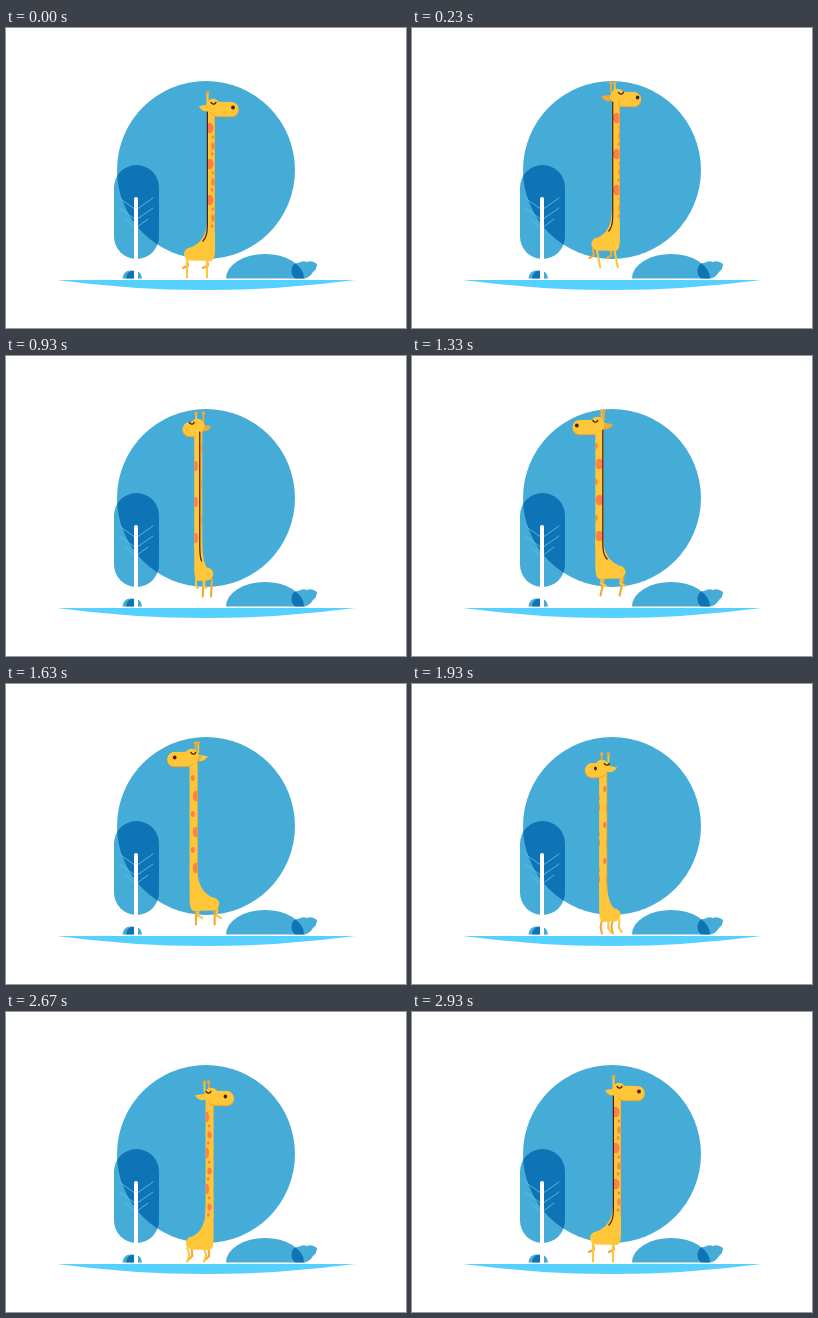
An HTML page with a canvas that plays this animation: 400x300 px, repeating every 2.96 s.

```html
<!DOCTYPE html>
<html lang="en">
<head>
<meta charset="utf-8">
<title>Jumping giraffe</title>
<style>
html, body { margin: 0; width: 100%; height: 100%; overflow: hidden; background: #fff; }
canvas { display: block; width: 400px; height: 300px; }
</style>
</head>
<body>
<canvas id="stage"></canvas>
<script>
const canvas = document.getElementById('stage');
const ctx = canvas.getContext('2d');
const ratio = window.devicePixelRatio || 1;
canvas.width = 400 * ratio;
canvas.height = 300 * ratio;

const LOOP = 2960, STEPS = 88, HOP = 11, AXIS = 196;
const BLUE = '#45abd7', DEEP = '#0f74b5', ICE = '#55d0ff';
const SKIN = '#ffc63a', SHADE = '#f3a832', SPOT = '#ff7f45', DARK = '#4a2015';

// height of the body and bend of the legs through one hop
const LIFT = [0, 3, 5, 5, -1, -6, -8, -10, -10, -8, -4];
const TUCK = [0, 0, 0, 0, 1, 3, 1, 0, 0, 0, 0];
const SWING = [0, 0, 0, 0, 0, 0, 2, 4, 4, 3, 1];

function circle(x, y, r) {
  ctx.beginPath();
  ctx.arc(x, y, r, 0, Math.PI * 2);
}

function disc(x, y, r, color) {
  circle(x, y, r);
  ctx.fillStyle = color;
  ctx.fill();
}

function line(points, width, color) {
  ctx.beginPath();
  points.forEach(([x, y], i) => i ? ctx.lineTo(x, y) : ctx.moveTo(x, y));
  ctx.lineWidth = width;
  ctx.strokeStyle = color;
  ctx.stroke();
}

function fillShape(trace, color) {
  trace();
  ctx.fillStyle = color;
  ctx.fill();
}

// one shape, darker where it lies over another
function overlap(trace, under) {
  fillShape(trace, BLUE);
  ctx.save();
  under();
  ctx.clip();
  fillShape(trace, DEEP);
  ctx.restore();
}

const sun = () => circle(200, 142, 89);

function crown() {
  ctx.beginPath();
  ctx.roundRect(108, 137, 45, 94, 22.5);
}

function hill() {
  ctx.beginPath();
  ctx.ellipse(259, 250.5, 39, 24.5, 0, Math.PI, Math.PI * 2);
  ctx.closePath();
}

function bush() {
  ctx.beginPath();
  ctx.moveTo(289, 250.5);
  ctx.quadraticCurveTo(284, 246, 286, 240);
  ctx.quadraticCurveTo(287, 235, 292, 235);
  ctx.quadraticCurveTo(297, 232, 301, 234);
  ctx.quadraticCurveTo(306, 232, 311, 236);
  ctx.quadraticCurveTo(311, 241, 307, 244);
  ctx.quadraticCurveTo(304, 249, 299, 250.5);
  ctx.closePath();
}

function mound(x) {
  ctx.beginPath();
  ctx.arc(x, 250.5, 8, Math.PI, Math.PI * 2);
  ctx.closePath();
}

function scenery() {
  fillShape(sun, BLUE);
  overlap(crown, sun);
  for (const [y, reach] of [[170, 17], [180, 17], [191, 12]]) {
    for (const side of [-1, 1]) {
      line([[130 + side * reach, y], [130 + side * 2, y + reach * 0.62]], 0.9, '#5dbde8');
    }
  }
  fillShape(() => mound(124.5), BLUE);
  overlap(() => mound(128), () => mound(124.5));
  line([[130, 171], [130, 246]], 4, '#fff');
  ctx.fillStyle = '#fff';
  ctx.fillRect(128, 240, 4, 12);
  fillShape(hill, BLUE);
  overlap(bush, hill);
  ctx.beginPath();
  ctx.moveTo(51, 252);
  ctx.lineTo(349, 252);
  ctx.quadraticCurveTo(200, 272, 51, 252);
  ctx.fillStyle = ICE;
  ctx.fill();
}

function giraffe(turn, phase) {
  const c = Math.cos(turn), s = Math.sin(turn);
  const way = c < 0 ? -1 : 1;
  const px = (front, side = 0) => AXIS + front * c + side * s;
  const lift = LIFT[phase];
  const neck = px(9), rump = px(-11.5);

  function leg(front, side) {
    const far = side * c < 0;
    const hip = 231;
    let knee, foot;
    if (side > 0) {
      const floor = Math.min(250, 250 + lift) - lift - TUCK[phase];
      const squash = Math.max(0, lift) * 0.5;
      knee = [px(front + SWING[phase] / 2 + squash, side), (hip + floor) / 2];
      foot = [px(front + SWING[phase], side), floor - 0.5];
    } else {
      const drop = lift > 2 ? 3 : 0;
      knee = [px(front + 1, side), 237.5 + drop / 2];
      foot = [px(front - 4, side), 240 + drop];
    }
    line([[px(front, side), hip], knee, foot], 2.1, far ? SHADE : SKIN);
  }

  function legs(near) {
    for (const side of [-4, 4]) {
      if ((side * c >= 0) !== near) continue;
      leg(-15, side);
      leg(5, side);
    }
  }

  function body() {
    disc(rump, 226, 6.5, SKIN);
    ctx.beginPath();
    ctx.moveTo(neck - 4 * way, 192);
    ctx.quadraticCurveTo(neck - 4 * way, 213, rump, 219.5);
    ctx.lineTo(rump, 232.5);
    ctx.lineTo(neck, 233);
    ctx.quadraticCurveTo(neck + 4 * way, 232, neck + 4 * way, 222);
    ctx.lineTo(neck + 4 * way, 192);
    ctx.closePath();
    ctx.fillStyle = SKIN;
    ctx.fill();
  }

  function spot(angle, y, ry, rx) {
    const a = turn + angle * Math.PI / 180;
    const depth = Math.sin(a);
    if (depth > 0.12) return;
    ctx.beginPath();
    ctx.ellipse(neck + 4 * Math.cos(a), y, Math.max(0.9, rx * -depth), ry, 0, 0, Math.PI * 2);
    ctx.fill();
  }

  function throat() {
    ctx.fillStyle = SKIN;
    ctx.fillRect(neck - 4, 79, 8, 122);
    ctx.save();
    ctx.beginPath();
    ctx.rect(neck - 4, 84, 8, 128);
    ctx.clip();
    ctx.fillStyle = SPOT;
    for (let i = 0; i < 3; i++) {
      const y = 100 + 36 * i;
      spot(-108, y, 5.2, 4);
      spot(108, y + 18, 5.2, 4);
      spot(-58, y + 18, 3.5, 2.2);
      spot(58, y, 3, 2);
      spot(-62, y + 9, 1.6, 1.4);
      spot(-75, y + 26, 1.8, 1.5);
    }
    ctx.fillStyle = SHADE;
    ctx.fillRect(neck + 3.3, 84, 0.7, 120);
    ctx.restore();
    if (s > -0.05) {
      const x = neck - 3.6 * c;
      ctx.beginPath();
      ctx.moveTo(x, 84);
      ctx.lineTo(x, 198);
      ctx.quadraticCurveTo(x, 209, x - 4.5 * c, 213);
      ctx.lineWidth = 1.2;
      ctx.strokeStyle = DARK;
      ctx.stroke();
    }
  }

  function ear(side) {
    const x = px(6, side * 3), tip = px(-3, side * 9);
    ctx.beginPath();
    ctx.moveTo(x, 77);
    ctx.quadraticCurveTo((x + tip) / 2, 76.5, tip, 78.5);
    ctx.quadraticCurveTo((x + tip) / 2, 85, x, 82.5);
    ctx.closePath();
    ctx.fillStyle = side * c < 0 ? SHADE : SKIN;
    ctx.fill();
  }

  function head() {
    for (const side of [-1, 1]) {
      const x = px(5.5, side * 4);
      line([[x, 74], [x, 66]], 1.8, side * c < 0 ? SHADE : SKIN);
      disc(x, 65, 1.8, SHADE);
      ear(side);
    }
    const back = px(15), nose = px(29.5);
    line([[back, 81.5], [nose, 81.8]], 14.8, SHADE);
    line([[back, 80.8], [nose, 81]], 14, SKIN);
    disc(px(11), 78, 7.2, SKIN);

    const eye = px(11.5, 6 * way);
    ctx.beginPath();
    ctx.arc(eye, 73.5, 2.6, 0.1 * Math.PI, 0.9 * Math.PI);
    ctx.lineWidth = 1.3;
    ctx.strokeStyle = DARK;
    ctx.stroke();
    if (s < 0.88) {
      ctx.beginPath();
      ctx.ellipse(px(31, 5 * way), 79.5, 0.9 + Math.abs(c), 1.9, 0, 0, Math.PI * 2);
      ctx.fillStyle = DARK;
      ctx.fill();
    }
  }

  ctx.save();
  ctx.translate(0, lift);
  legs(false);
  if (s > 0.05) head();
  body();
  throat();
  legs(true);
  if (s <= 0.05) head();
  ctx.restore();
}

function draw(time) {
  const tick = Math.floor(time % LOOP / 10) * 10;
  const step = Math.floor((tick + 3.4) * 0.03) % STEPS;
  ctx.setTransform(ratio, 0, 0, ratio, 0, 0);
  ctx.lineCap = ctx.lineJoin = 'round';
  ctx.fillStyle = '#fff';
  ctx.fillRect(0, 0, 400, 300);
  scenery();
  giraffe(step / STEPS * Math.PI * 2, step % HOP);
}

const start = performance.now();
function loop() {
  draw(performance.now() - start);
  requestAnimationFrame(loop);
}
loop();
</script>
</body>
</html>
```
